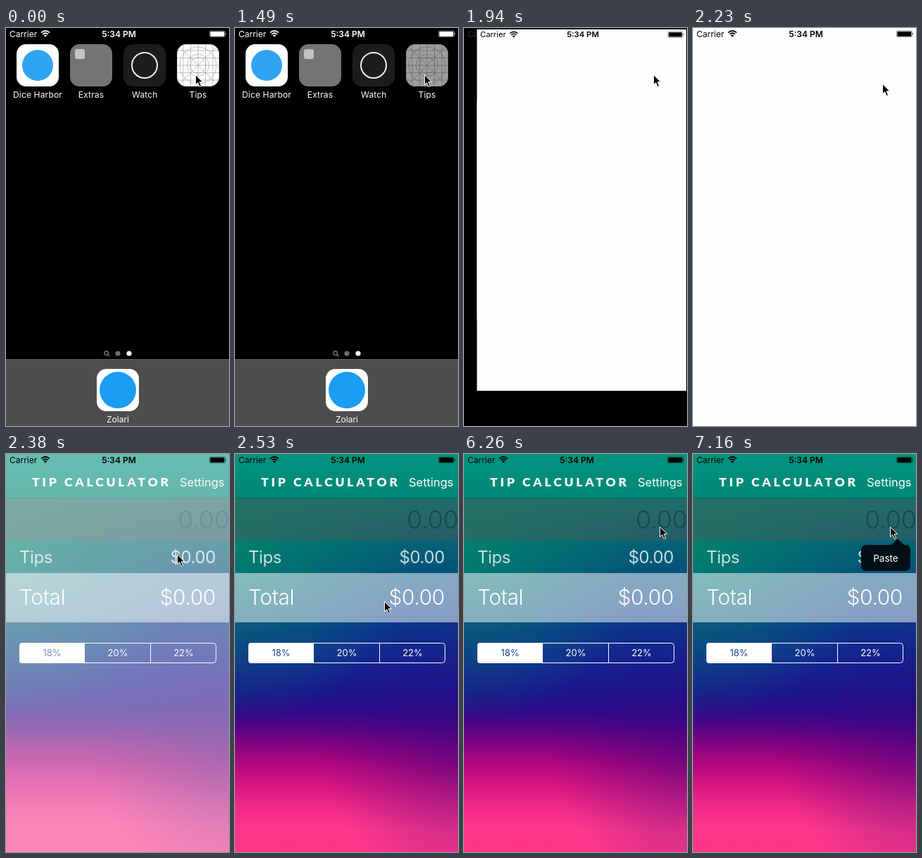
An HTML page that plays this animation: 317 px wide and 565 px high, repeating every 8000 ms.

```html
<!DOCTYPE html>
<html lang="en">
<head>
<meta charset="utf-8">
<title>Tip calculator launch</title>
<style>
  html, body { margin: 0; width: 100%; height: 100%; overflow: hidden; background: #000; }
  svg { display: block; width: 100vw; height: 100vh; font-family: Inter, Roboto, sans-serif; }
  .mid { text-anchor: middle; }
  .end { text-anchor: end; }
  .tight { letter-spacing: -.4px; }
</style>
</head>
<body>
<svg viewBox="0 0 317 565" preserveAspectRatio="none">
  <defs>
    <linearGradient id="sky" gradientUnits="userSpaceOnUse" x1="0" y1="0" x2="0" y2="565">
      <stop offset="0" stop-color="#009080"/>
      <stop offset=".11" stop-color="#007f78"/>
      <stop offset=".25" stop-color="#035c74"/>
      <stop offset=".33" stop-color="#084c82"/>
      <stop offset=".43" stop-color="#0b388a"/>
      <stop offset=".52" stop-color="#122690"/>
      <stop offset=".6" stop-color="#1b158c"/>
      <stop offset=".65" stop-color="#300a88"/>
      <stop offset=".69" stop-color="#560584"/>
      <stop offset=".73" stop-color="#850380"/>
      <stop offset=".78" stop-color="#b3077f"/>
      <stop offset=".83" stop-color="#d61581"/>
      <stop offset=".88" stop-color="#ee2887"/>
      <stop offset=".94" stop-color="#ff378b"/>
      <stop offset="1" stop-color="#ff368a"/>
    </linearGradient>
    <radialGradient id="glow" gradientUnits="userSpaceOnUse" cx="0" cy="130" r="250">
      <stop offset="0" stop-color="#008a6c" stop-opacity=".75"/>
      <stop offset="1" stop-color="#008a6c" stop-opacity="0"/>
    </radialGradient>
    <radialGradient id="dusk" gradientUnits="userSpaceOnUse" cx="330" cy="410" r="210">
      <stop offset="0" stop-color="#30067f" stop-opacity=".5"/>
      <stop offset="1" stop-color="#30067f" stop-opacity="0"/>
    </radialGradient>
    <linearGradient id="bar" x1="0" y1="0" x2="0" y2="1">
      <stop offset="0" stop-color="#00947e"/>
      <stop offset="1" stop-color="#008776"/>
    </linearGradient>
    <clipPath id="rounded"><rect id="corners" width="317" height="565"/></clipPath>
    <clipPath id="tileShape"><rect width="60" height="60" rx="13.5"/></clipPath>

    <g id="status" fill="currentColor" font-size="12">
      <text x="5" y="12.5">Carrier</text>
      <text x="160.5" y="12.5" class="mid" font-weight="600">5:34 PM</text>
      <g fill="none" stroke="currentColor" stroke-width="1.7">
        <path d="M50 6.6Q56 1.4 62 6.6M52.2 8.9Q56 5.6 59.8 8.9"/>
      </g>
      <path d="M53.8 10.6Q56 8.6 58.2 10.6L56 13z"/>
      <rect x="289.4" y="3.9" width="22" height="9" rx="1.8" fill="none" stroke="currentColor" stroke-width=".8" opacity=".5"/>
      <rect x="290.4" y="4.9" width="20" height="7" rx=".8"/>
      <path d="M312.2 6.6q1.8 1.6 0 3.4z"/>
    </g>

    <g id="tipsIcon" clip-path="url(#tileShape)">
      <rect width="60" height="60" fill="#fff"/>
      <g fill="none" stroke="#999" stroke-width=".6">
        <path d="M9 0V60M19.5 0V60M30 0V60M40.5 0V60M51 0V60M0 9H60M0 19.5H60M0 30H60M0 40.5H60M0 51H60M0 0L60 60M60 0L0 60"/>
        <circle cx="30" cy="30" r="26"/>
        <circle cx="30" cy="30" r="15.6"/>
        <circle cx="30" cy="30" r="11.2"/>
        <rect width="60" height="60" rx="13.5"/>
      </g>
      <rect id="press" width="60" height="60" opacity=".38"/>
    </g>
  </defs>

  <rect width="317" height="565"/>

  <g id="home">
    <rect x="15" y="23" width="60" height="60" rx="13.5" fill="#fff"/>
    <circle cx="45" cy="53" r="22" fill="#2fa4f2"/>
    <rect x="91" y="23" width="60" height="60" rx="13.5" fill="#747474"/>
    <rect x="98" y="30" width="14" height="14" rx="3" fill="#c6c3c0"/>
    <rect x="167" y="23" width="60" height="60" rx="13.5" fill="#1c1c1c"/>
    <circle cx="197" cy="53" r="18" fill="none" stroke="#eee" stroke-width="2"/>
    <use id="homeTips" href="#tipsIcon" x="243" y="23"/>
    <g id="labels" class="mid" fill="#fff" font-size="12" letter-spacing=".15">
      <text x="45" y="98.8">Dice Harbor</text>
      <text x="121" y="98.8">Extras</text>
      <text x="197.3" y="98.8">Watch</text>
      <text x="273" y="98.8">Tips</text>
    </g>
    <g fill="none" stroke="#777" stroke-width="1.4">
      <circle cx="142.7" cy="461.6" r="2.8"/><path d="M144.8 463.7l2.6 2.6"/>
    </g>
    <circle cx="159" cy="462" r="3.6" fill="#707070"/>
    <circle cx="175" cy="462" r="3.6" fill="#fff"/>
    <rect y="470" width="317" height="95" fill="#4d4d4d"/>
    <rect y="470" width="317" height="1" fill="#626262"/>
    <rect x="129" y="484" width="60" height="60" rx="13.5" fill="#fff"/>
    <circle cx="159" cy="514" r="26" fill="#1a9df2"/>
    <text x="159" y="560" class="mid" fill="#fff" font-size="12">Zolari</text>
  </g>
  <use id="homeStatus" href="#status" color="#fff"/>

  <g id="launch">
    <g clip-path="url(#rounded)">
      <rect width="317" height="565"/>
      <use href="#tipsIcon" transform="scale(5.2833 9.4167)"/>
      <rect id="cover" width="317" height="565" fill="#fefefe"/>
      <use href="#status" color="#000"/>
    </g>
  </g>

  <g id="app">
    <rect width="317" height="565" fill="url(#sky)"/>
    <rect width="317" height="565" fill="url(#dusk)"/>
    <rect width="317" height="565" fill="url(#glow)"/>
    <rect width="317" height="62" fill="url(#bar)"/>
    <rect y="62" width="317" height="1" fill="#036b62"/>
    <rect y="63" width="317" height="60" fill="#555" opacity=".42"/>
    <rect y="169" width="317" height="70" fill="#fff" opacity=".51"/>
    <use href="#status" color="#000"/>
    <g fill="#fff">
      <text x="37" y="46" font-family="Lato, sans-serif" font-weight="900" font-size="17.5" letter-spacing="3.8">TIP CALCULATOR</text>
      <text x="310.5" y="46" class="end" font-size="16.5">Settings</text>
      <text x="317.5" y="106" class="end tight" font-weight="300" font-size="36" fill="#002a3c" fill-opacity=".45">0.00</text>
      <g class="tight" font-size="24" fill-opacity=".78">
        <text x="19" y="155">Tips</text>
        <text x="298" y="155" class="end">$0.00</text>
      </g>
      <g class="tight" font-size="30" font-weight="350">
        <text x="19" y="214">Total</text>
        <text x="298" y="214" class="end">$0.00</text>
      </g>
      <path d="M112 268H23q-4 0-4 4v21q0 4 4 4H112z"/>
      <rect x="19.5" y="268.5" width="279" height="28" rx="4" fill="none" stroke="#fff"/>
      <path d="M205.5 268V297" stroke="#fff"/>
      <g class="mid" font-size="13">
        <text x="65.5" y="287" fill="#12488c">18%</text>
        <text x="159" y="287">20%</text>
        <text x="252.5" y="287">22%</text>
      </g>
    </g>
    <g id="popup">
      <path d="M247 129H282L291 120.5L300 129H301q8 0 8 8V158q0 8-8 8H247q-8 0-8-8V137q0-8 8-8z" fill="#030f17"/>
      <text x="274" y="153" class="mid" fill="#fff" font-size="13.5">Paste</text>
    </g>
  </g>

  <path id="cursor" d="M.5.5V14.6L3.7 11.6L6.2 17.4L8.6 16.4L6.1 10.7H10.6z" stroke="#fff" stroke-width="1"/>
</svg>
<script>
const LOOP = 8000, PRESS = 1490, POPUP = 7160;

// time, cursor x, cursor y, launch zoom 0..1, app opacity
const steps = [
  [0, 269, 66, 0, 0],
  [1790, 269, 66, .492, 0],
  [1940, 269, 66, .925, 0],
  [2080, 269, 72, .992, 0],
  [2230, 269, 79, 1, 0],
  [2380, 243, 142, 1, .6],
  [2530, 212, 209, 1, 1],
  [2680, 207, 223, 1, 1],
  [2830, 212, 215, 1, 1],
  [2970, 248, 119, 1, 1],
  [3120, 274, 59, 1, 1],
  [3270, 275, 54, 1, 1],
  [3420, 257, 137, 1, 1],
  [3570, 257, 135, 1, 1],
  [3710, 272, 108, 1, 1],
  [3860, 275, 104, 1, 1],
  [4010, 276, 103, 1, 1],
  [6260, 278, 103, 1, 1],
  [6410, 280, 103, 1, 1],
];

const el = id => document.getElementById(id);
const show = (id, on) => { el(id).style.display = on ? "" : "none"; };

function zoomTo(p) {
  const scale = 1 + p * (317 / 60 - 1);
  const width = 60 * scale, height = scale * (60 + 47 * p);
  el("home").setAttribute("transform",
    `translate(${-299 * (scale - 1)} ${-28.3 * (scale - 1)}) scale(${scale})`);
  el("launch").setAttribute("transform",
    `translate(${243 * (1 - p)} ${23 * (1 - p)}) scale(${width / 317} ${height / 565})`);
  el("labels").setAttribute("opacity", 1 - .9 * p);
  el("homeStatus").setAttribute("opacity", 1 - .9 * p);
  el("cover").setAttribute("opacity", Math.min(1, 1.88 * p));
  el("corners").setAttribute("rx", 12 * (1 - p));
  show("launch", p > 0);
  show("homeTips", p === 0);
}

function draw(now) {
  const t = now % LOOP;
  const [, x, y, zoom, fade] = steps.findLast(step => step[0] <= t);
  zoomTo(zoom);
  show("press", t >= PRESS);
  show("app", fade > 0);
  show("popup", t >= POPUP);
  el("app").setAttribute("opacity", fade);
  el("cursor").setAttribute("transform", `translate(${x} ${y})`);
}

const start = performance.now();
function tick() {
  draw(performance.now() - start);
  requestAnimationFrame(tick);
}
tick();
</script>
</body>
</html>
```
